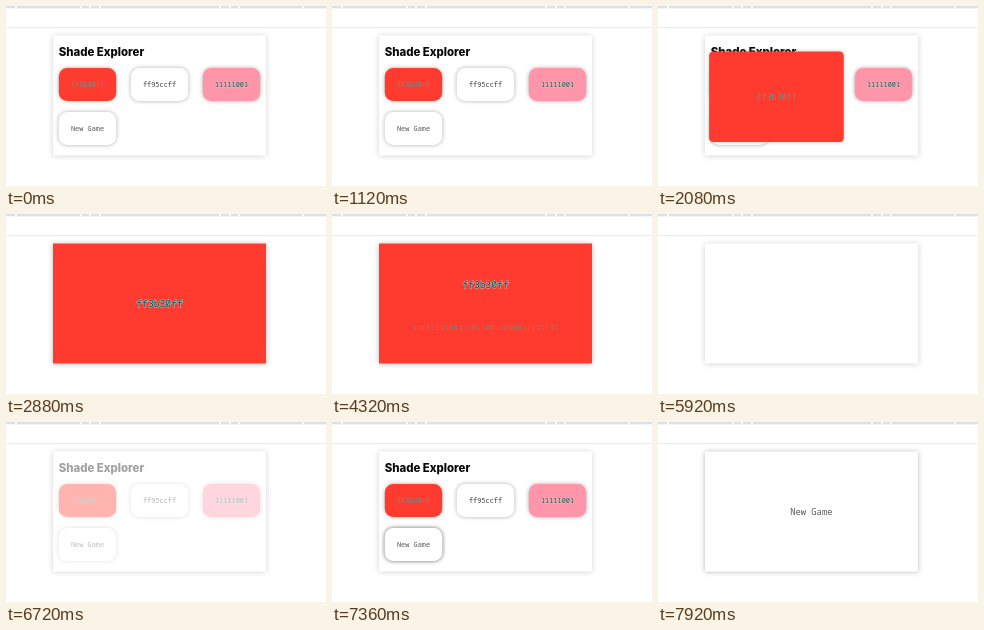
An HTML page with a canvas that plays this animation: 320 by 180 pixels, repeating every 8 s.

```html
<!DOCTYPE html>
<html lang="en">
<head>
<meta charset="utf-8">
<title>Shade Explorer</title>
<style>
html, body { margin: 0; width: 100%; height: 100%; overflow: hidden; background: #fff; }
canvas { display: block; width: 320px; height: 180px; }
</style>
</head>
<body>
<canvas id="stage" width="320" height="180"></canvas>
<script>
const ctx = document.getElementById('stage').getContext('2d');
const LOOP = 8000;
const MONO = '"Noto Sans Mono", "DejaVu Sans Mono", monospace';
const RED = '#ff3b30';
const PANEL = { left: 47, top: 29.5, right: 260, bottom: 149.5 };

const card = (left, top, fill, label, ink, glow) =>
  ({ left, top, right: left + 57.4, bottom: top + 33, fill, label, ink, glow });
const CARDS = {
  red: card(52.8, 62, RED, 'ff3b30ff', '#688f88'),
  white: card(124.8, 62, '#fff', 'ff95ccff', '#3c3c3c'),
  pink: card(196.8, 62, '#ff95a8', '11111001', '#2c4a4a', 'rgba(190,225,215,0.6)'),
  game: card(52.8, 106, '#fff', 'New Game', '#585858'),
};

const clamp = v => Math.min(1, Math.max(0, v));
const mix = (a, b, u) => a + (b - a) * u;
const span = (t, from, to) => clamp((t - from) / (to - from));

// Cubic bezier (0.4, 0, 0.2, 1), solved by bisection.
function ease(p) {
  if (p <= 0 || p >= 1) return clamp(p);
  let lo = 0, hi = 1;
  for (let i = 0; i < 20; i++) {
    const s = (lo + hi) / 2, r = 1 - s;
    if (1.2 * s * r * r + 0.6 * s * s * r + s ** 3 < p) lo = s; else hi = s;
  }
  return 3 * lo * lo - 2 * lo ** 3;
}

function box(r, radius, fill, shade, blur) {
  ctx.save();
  ctx.shadowColor = `rgba(0,0,0,${shade})`;
  ctx.shadowBlur = blur;
  ctx.fillStyle = fill;
  ctx.beginPath();
  ctx.roundRect(r.left, r.top, r.right - r.left, r.bottom - r.top, radius);
  ctx.fill();
  ctx.restore();
}

function label(text, x, y, size, ink, glow) {
  ctx.save();
  ctx.font = `500 ${size}px ${MONO}`;
  ctx.textAlign = 'center';
  ctx.textBaseline = 'alphabetic';
  if (glow) {
    ctx.strokeStyle = glow;
    ctx.lineWidth = 1;
    ctx.lineJoin = 'round';
    ctx.strokeText(text, x, y + size * 0.34);
  }
  ctx.fillStyle = ink;
  ctx.fillText(text, x, y + size * 0.34);
  ctx.restore();
}

function drawCard(c) {
  box(c, 8.5, c.fill, 0.32, 4);
  label(c.label, (c.left + c.right) / 2, (c.top + c.bottom) / 2 + 0.6, 6.9, c.ink, c.glow);
}

function drawPage() {
  ctx.globalAlpha = 1;
  ctx.fillStyle = '#fff';
  ctx.fillRect(0, 0, 320, 180);
  ctx.fillStyle = '#dcdfe8';
  ctx.fillRect(0, 0, 320, 2.3);
  ctx.fillStyle = '#f8f9fc';
  for (const x of [9, 74, 83, 93, 213, 223, 232, 296]) ctx.fillRect(x, 0, 2, 2.3);
  ctx.fillStyle = '#e9eaec';
  ctx.fillRect(0, 21, 320, 1);
  box(PANEL, 0, '#fff', 0.18, 6);
}

function drawHome(alpha) {
  ctx.font = '800 11.4px Inter, "Open Sans", sans-serif';
  ctx.fillStyle = '#080808';
  ctx.textAlign = 'left';
  ctx.textBaseline = 'alphabetic';
  ctx.fillText('Shade Explorer', 52.8, 50);
  Object.values(CARDS).forEach(drawCard);
  // A white veil fades the whole panel evenly.
  ctx.globalAlpha = 1 - alpha;
  box(PANEL, 0, '#fff', 0, 0);
  ctx.globalAlpha = 1;
}

// Opposite corners follow curved paths from the card to the panel.
function expand(c, u) {
  return {
    left: mix(c.left, PANEL.left, mix(u, u * u, 0.85)),
    top: mix(c.top, PANEL.top, u),
    right: mix(c.right, PANEL.right, u),
    bottom: mix(c.bottom, PANEL.bottom, 1 - (1 - u) ** 2),
  };
}

function drawExpanded(c, u, size, lift = 0, glow) {
  const r = expand(c, u);
  box(r, 8.5 * (1 - u), c.fill, mix(0.32, 0.12, u), 4);
  label(c.label, (r.left + r.right) / 2, (r.top + r.bottom) / 2 + 0.6 - lift,
    mix(6.9, size, u), glow ? '#19383a' : c.ink, glow);
}

function drawRed(t) {
  const u = ease(span(t, 1840, 2525));
  const reveal = ease(span(t, 3560, 4240));
  ctx.globalAlpha = 1 - span(t, 5300, 5900);
  drawExpanded(CARDS.red, u, 9.7, 19 * reveal, t >= 2525 ? '#a4dcd6' : undefined);
  ctx.globalAlpha *= span(t, 3700, 4300);
  const bits = [0xff, 0x3b, 0x30, 0xff].map(n => n.toString(2).padStart(8, '0')).join('');
  label(bits, 153.5, 113, 7.65, '#8a7c72');
  ctx.globalAlpha = 1;
}

function draw(t) {
  drawPage();
  if (t < 2525) drawHome(1);
  else if (t >= 6400) drawHome(span(t, 6400, 7240));
  if (t >= 1840 && t < 5900) drawRed(t);
  if (t >= 7360) drawExpanded(CARDS.game, ease(span(t, 7360, 7960)), 8.8);
}

function frame() {
  draw(performance.now() % LOOP);
  requestAnimationFrame(frame);
}
frame();
</script>
</body>
</html>
```
